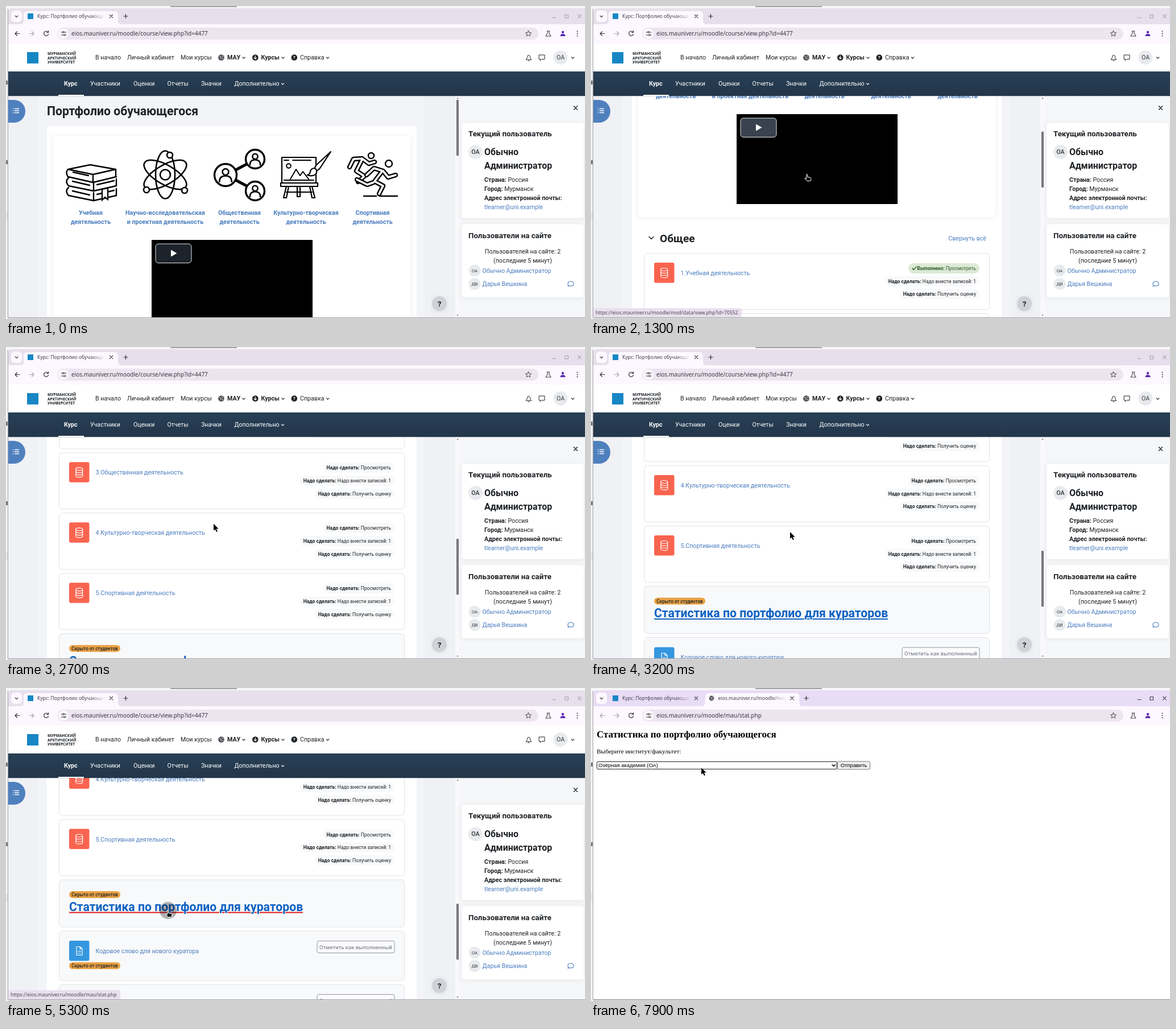
These frames come from a looping animation (1018 px wide and 550 px high, 8000 ms). An HTML page:

```html
<!DOCTYPE html>
<html lang="ru">
<head>
<meta charset="utf-8">
<title>Портфолио</title>
<style>
html, body { margin: 0; width: 100%; height: 100%; overflow: hidden; background: #fff; }
svg { display: block; width: 100%; height: 100%; font-family: Roboto, sans-serif; }
text { white-space: pre; }
.b { font-weight: 700; }
.m { font-weight: 500; }
.ui { font-family: "Noto Sans", sans-serif; }
.serif { font-family: "Liberation Serif", serif; }
.sans { font-family: "Liberation Sans", sans-serif; }
.c { text-anchor: middle; }
.r { text-anchor: end; }
.line { fill: none; stroke-linecap: round; stroke-linejoin: round; }
</style>
</head>
<body>
<svg id="stage" viewBox="0 0 1018 550" preserveAspectRatio="none"></svg>
<script>
const INK = '#1d2125', LINK = '#4a7dbf', BODY = 10.65, SMALL = 8.5;

const text = (x, y, str, size = BODY, cls = '', fill = INK) =>
  `<text x="${x}" y="${y}" font-size="${size}" class="${cls}" fill="${fill}">${str}</text>`;
const rect = (x, y, w, h, fill, r = 0, more = '') =>
  `<rect x="${x}" y="${y}" width="${w}" height="${h}" rx="${r}" fill="${fill}" ${more}/>`;
const circle = (x, y, r, fill, more = '') =>
  `<circle cx="${x}" cy="${y}" r="${r}" fill="${fill}" ${more}/>`;
const line = (d, color = INK, width = 1.2, more = '') =>
  `<path class="line" d="${d}" stroke="${color}" stroke-width="${width}" ${more}/>`;
const shape = (d, fill, more = '') => `<path d="${d}" fill="${fill}" ${more}/>`;
const group = (body, more = '') => `<g ${more}>${body}</g>`;
const at = (x, y, body) => group(body, `transform="translate(${x} ${y})"`);
const chevron = (x, y, s = 2.2, color = INK) => line(`M${x - s} ${y - s / 2}l${s} ${s}l${s} ${-s}`, color);
const cross = (x, y, s, color = '#333', w = 1.2) =>
  line(`M${x - s} ${y - s}l${2 * s} ${2 * s}m0 ${-2 * s}l${-2 * s} ${2 * s}`, color, w);
const avatar = (x, y, r, label, size, cls = '') =>
  circle(x, y, r, '#e8eaed') + text(x, y + size * .36, label, size, 'c ' + cls, '#343a40');

// Browser window
const tab = (x, title, icon) => at(x, 0, icon + text(24, 21.3, title, SMALL, 'ui', 'url(#fade)') + cross(154, 18, 2.6));
const plus = x => line(`M${x - 3.5} 18h7m-3.5 -3.5v7`, '#333');
const tabShape = x => shape(`M${x - 6} 32q6 0 6 -6v-10q0 -7 7 -7h152q7 0 7 7v10q0 6 6 6z`, '#fdf7ff');
const siteIcon = rect(7, 13, 10, 10, '#1687c4');
const globe = (x, y, r) => circle(x, y, r, '#4a4a50') +
  line(`M${x - r * .6} ${y - r * .4}l${r * .6} ${r * .3}l${-r * .2} ${r * .5}M${x + r * .2} ${y - r * .7}l${r * .4} ${r * .5}M${x + r * .2} ${y + r * .5}l${r * .4} ${-r * .2}`, '#fff', .9);

const backdrop =
  rect(0, 0, 1018, 550, '#f6f6f7') + rect(289, 0, 117, 2, '#a3a2a8') +
  rect(0, 131, 3, 7, '#77777b') + rect(0, 271, 3, 7, '#77777b') + rect(0, 361, 3, 14, '#e8e8eb') +
  rect(2.8, 5, 1.2, 543, '#a9a8ae') + rect(4, 547, 1014, 1.5, '#a9a8ae', 0, 'id="edge"') + rect(4, 548.5, 1014, 1.5, '#d9d8dc');

const toolbar =
  rect(4, 32, 1014, 34, '#fdf7ff') + rect(90, 38, 846, 21, '#ece5f0', 10.5) + circle(101, 48.5, 9, '#fdf9ff') +
  line('M97 46h2m4 0h3M97 51h3m4 0h2', '#333') + circle(101, 46, 1.4, 'none', 'stroke="#333"') + circle(102.5, 51, 1.4, 'none', 'stroke="#333"') +
  line('M24 48.5h-8m3.5 -3.5l-3.5 3.5l3.5 3.5', '#333', 1.2, 'id="back"') +
  line('M41 48.5h8m-3.5 -3.5l3.5 3.5l-3.5 3.5', '#aaa4af') +
  line('M74 46a4 4 0 1 0 .5 3.5M74.5 43.5v3h-3', '#333') +
  line('M918.500 43.500l1.500 3.300l3.600 .3l-2.700 2.300l.8 3.500l-3.200 -1.900l-3.200 1.900l.8 -3.500l-2.700 -2.300l3.600 -.3z', '#444', 1) +
  line('M951 44h5M952 44v4l-3 5h9l-3 -5v-4', '#444', 1.1) +
  circle(979, 46, 2.2, '#5b2bb5') + shape('M974.500 53q0 -4 4.500 -4t4.500 4z', '#5b2bb5') +
  [44.5, 48.5, 52.5].map(y => circle(1004.5, y, 1, '#333')).join('');

const strip =
  shape('M4 33v-23q0 -6 6 -6h1008v29z', '#e7dfeb', 'id="strip"') + rect(9, 8, 19, 20, '#fdf7ff', 6) + chevron(18.5, 18.4, 2.4, '#333') +
  group(line('M961 20.500h6M983 15.500h5.500v5.500h-5.500z', 'currentColor', 1.1) + cross(1008.5, 18, 2.8, 'currentColor', 1.1), 'id="controls"');

// Course page
const person = (x, y, r) => circle(x, y, r, '#fff', 'stroke="#000" stroke-width="3.4"') +
  circle(x, y - r * .28, r * .28, '#fff', 'stroke="#000" stroke-width="2.6"') +
  line(`M${x - r * .55} ${y + r * .6}q0 ${-r * .52} ${r * .55} ${-r * .52}t${r * .55} ${r * .52}`, '#000', 2.6);
const tube = d => line(d, '#000', 8.4) + line(d, '#fff', 3.6);

const books =
  line('M109 287l39 -8l45 8l-40 9zM109 287q-5 5 0 13l44 10l41 -10M153 296v13M193 287v13M118 292l27 6', '#000', 2.4) +
  [305, 322].map(y => line(`M110 ${y - 3}q-7 6 0 14l44 9l40 -9v-12M154 ${y + 6}v13M160 ${y + 9}l30 -7M117 ${y + 3}l30 7`, '#000', 2.4)).join('') +
  shape('M169 322l10 -2v20l-5 -4l-5 5z', '#fff', 'stroke="#000" stroke-width="2.2"');
const atom =
  [30, 90, 150].map(a => `<ellipse cx="280" cy="296.500" rx="42" ry="17" fill="none" stroke="#000" stroke-width="2.600" transform="rotate(${a} 280 296.500)"/>`).join('') +
  [[280, 296.5, 9], [288, 262, 5], [247, 323, 5], [314, 324, 5]].map(([x, y, r]) => circle(x, y, r, '#fff', 'stroke="#000" stroke-width="2.600"')).join('');
const network = line('M387 297L438 270M387 297L438 324', '#000', 5) +
  person(386, 297, 19.5) + person(438, 269, 16.5) + person(438, 325, 16.5);
const easel =
  line('M485 311v-45h60v45M483 311h65v6h-65zM493 317l-5 20h5l4 -20M538 317l5 20h-5l-4 -20M512 317v18h5v-18M493 327h45', '#000', 2.2) +
  line('M489 306h52M500 304l10 -17l7 11l5 -7l10 13M489 271h8M504 271h32', '#000', 2) + circle(497, 281, 3.8, 'none', 'stroke="#000" stroke-width="2"') +
  shape('M571 256l-19 29q-5 6 -8 3t2 -9z', '#fff', 'stroke="#000" stroke-width="2.200" stroke-linejoin="round"') +
  shape('M543 285q-7 0 -8 6t-6 6q10 3 15 -1q4 -4 1 -9z', '#fff', 'stroke="#000" stroke-width="2.200"');
const runners =
  circle(642, 263, 5, '#fff', 'stroke="#000" stroke-width="2.400"') +
  tube('M604 283l7 -14l15 -1l12 9l10 -3M626 270l-10 20l14 9l-11 10') +
  circle(673, 277, 6, '#fff', 'stroke="#000" stroke-width="2.400"') +
  tube('M634 297l13 -12l16 5l9 11l13 -4M661 291l-13 17l15 8l-7 14M646 310l-11 4l-18 -9') +
  line('M629 334h22M657 334h31', '#000', 2.4);

const captions = [[149, 'Учебная', 'деятельность'], [280, 'Научно-исследовательская', 'и проектная деятельность'],
  [410.5, 'Общественная', 'деятельность'], [527.5, 'Культурно-творческая', 'деятельность'], [644.5, 'Спортивная', 'деятельность']]
  .map(([x, a, b]) => text(x, 367, a, BODY, 'b c', LINK) + text(x, 382.6, b, BODY, 'b c', LINK)).join('');

const video = rect(256, 411, 283, 158, '#000') +
  rect(263, 418, 63, 33.5, '#1d232b', 5, 'id="play" stroke="#e8e8e8"') + shape('M290 428.500l10.500 6l-10.500 6z', '#fff');

const pill = (left, y, label, value) => rect(left, y - 9, 683 - left, 18, '#f8f9fa', 9) +
  `<text x="677" y="${y + 3}" font-size="${SMALL}" class="r" fill="${INK}"><tspan class="b">${label}:</tspan> ${value}</text>`;
const frame = (y, h, fill) => rect(93.5, y, 607, h, fill, 6, 'stroke="#dee2e6"');
const hiddenBadge = y => rect(111, y, 90, 12, '#e8a145', 6) + text(156, y + 9, 'Скрыто от студентов', 8.15, 'm c');
const doneButton = y => rect(547, y, 136, 21, '#fbfbfc', 3, 'stroke="#8f959e"') + text(615, y + 14, 'Отметить как выполненный', 9.6, 'c', '#6a737b');

const database = line('M-6 -6a6 2.500 0 0 1 12 0v12a6 2.500 0 0 1 -12 0zM-6 -6a6 2.500 0 0 0 12 0M-6 -2a6 2.500 0 0 0 12 0M-6 2a6 2.500 0 0 0 12 0', '#fff', 1.2);
const items = ['Учебная', 'Научно-исследовательская', 'Общественная', 'Культурно-творческая', 'Спортивная'].map((name, i) => {
  const first = i === 0;
  return at(0, 655 + 106 * i, frame(.5, 99, '#fff') + rect(111, 17, 35.5, 35.5, '#f9644f', 3) + at(128.7, 35, database) +
    text(157.5, 39, `${i + 1}.${name} деятельность`, BODY, '', LINK) +
    (first ? rect(558, 18, 125, 18, '#dce9d6', 9) + line('M565 27l2.300 2.500l4.500 -5', '#2b5a24', 1.4) +
      `<text x="677" y="30" font-size="${SMALL}" class="r" fill="#2b5a24"><tspan class="b">Выполнено:</tspan> Просмотреть</text>`
      : pill(558, 27, 'Надо сделать', 'Просмотреть')) +
    pill(517, 49.6, 'Надо сделать', 'Надо внести записей: 1') + pill(543, 72.3, 'Надо сделать', 'Получить оценку'));
}).join('');

const statistics = frame(1185.5, 83, '#f8f9fa') + hiddenBadge(1205.5) +
  rect(111, 1242, 411, 2, '#0f62c2', 0, 'id="underline"') +
  group(text(111, 1240.3, 'Статистика по портфолио для кураторов', 21.2, 'b', '#0f62c2'), 'paint-order="stroke" stroke="#f8f9fa" stroke-width="2"');
const codeword = frame(1275.5, 87, '#f8f9fa') + rect(111, 1292.5, 35.5, 35.5, '#3597df', 3) +
  line('M124 1303h6l4 4v11h-10zM130 1303v4h4M126.500 1311h5M126.500 1314.500h5', '#fff') +
  text(157.5, 1314, 'Кодовое слово для нового куратора', BODY, '', LINK) + hiddenBadge(1330.5) + doneButton(1293);

const content =
  text(72, 192, 'Портфолио обучающегося', 21.2, 'b') + rect(72, 211, 650, 1300, '#fff', 7) +
  rect(83, 228, 628, 364, '#fff', 5, 'filter="url(#soft)"') +
  books + atom + network + easel + runners + captions + video +
  line('M102 626.500l4 4l4 -4', INK, 1.5) + text(121, 635.5, 'Общее', 19.1, 'b') + text(695, 632.6, 'Свернуть всё', BODY, 'r', LINK) +
  items + statistics + codeword + frame(1369.5, 87, '#f8f9fa') + doneButton(1387);

const navText = (y, fill, list) => list.map(([x, s, cls = '']) => text(x, y, s, BODY, cls, fill)).join('');
const header =
  rect(4, 66, 1014, 49, '#fff') + rect(37, 81, 20, 20, '#1687c4') +
  ['МУРМАНСКИЙ', 'АРКТИЧЕСКИЙ', 'УНИВЕРСИТЕТ'].map((s, i) => text(73, 86.4 + 7.2 * i, s, 6.6, 'ui b')).join('') +
  navText(94.3, INK, [[157, 'В начало'], [213, 'Личный кабинет'], [307, 'Мои курсы'], [389, 'МАУ', 'b'], [448.5, 'Курсы', 'b'], [517, 'Справка']]) +
  globe(378.5, 90.5, 5.3) + circle(438.3, 90.5, 5.3, INK) + line('M438.300 87.500v5.500m-2.300 -2.200l2.300 2.300l2.300 -2.300', '#fff') +
  circle(506.8, 90.5, 5.3, INK) + text(506.8, 93.4, '?', 8, 'b c', '#fff') +
  [418, 487, 565.5, 996.5].map(x => chevron(x, 91)).join('') +
  line('M914.500 94q2 -2 2 -4.500q0 -3 2.500 -3t2.500 3q0 2.500 2 4.500zM918 96h2', INK, 1) +
  line('M937.500 86h9.500v7.500h-5l-2.500 2.500v-2.500h-2z', INK, 1) + avatar(975, 90.5, 12.5, 'ОА', BODY) +
  rect(4, 115, 1014, 43, 'url(#navy)') +
  navText(140, '#fff', [[102, 'Курс', 'b'], [148, 'Участники'], [224, 'Оценки'], [283.5, 'Отчеты'], [343, 'Значки'], [401.5, 'Дополнительно']]) +
  chevron(486.5, 137, 2.2, '#fff') + rect(92, 156, 45, 2, '#fff') + rect(4, 158, 1014, 1.5, '#00000018');

const field = (y, label, value) => `<text x="841" y="${y}" font-size="${BODY}" fill="${INK}"><tspan class="b">${label}:</tspan> ${value}</text>`;
const drawer =
  rect(797, 158, 221, 389, '#f6f7f9') + cross(1001.5, 179, 3, INK, 1.5) +
  rect(801, 205, 215, 167.5, '#fff', 5, 'filter="url(#soft)"') + rect(801, 383.5, 215, 128.5, '#fff', 5, 'filter="url(#soft)"') +
  text(813, 228.6, 'Текущий пользователь', 13.3, 'b') + avatar(825.5, 256.5, 12.5, 'ОА', BODY, 'm') +
  text(841, 262, 'Обычно', 15.9, 'b') + text(841, 286, 'Администратор', 15.9, 'b') +
  field(309.2, 'Страна', 'Россия') + field(325.3, 'Город', 'Мурманск') + field(341.3, 'Адрес электронной почты', '') +
  text(841, 357.2, 'tlearner@uni.example', BODY, '', LINK) + text(813, 407.5, 'Пользователи на сайте', 13.3, 'b') +
  text(908.5, 435.2, 'Пользователей на сайте: 2', BODY, 'c') + text(908.5, 450.8, '(последние 5 минут)', BODY, 'c') +
  avatar(824, 465, 10.5, 'ОА', 8) + text(837.5, 469, 'Обычно Администратор', BODY, '', LINK) +
  avatar(824, 488.5, 10.5, 'ДВ', 8) + text(837.5, 492.4, 'Дарья Вешкина', BODY, '', LINK) +
  line('M989 492q-1 -1 -1 -4q0 -4 5 -4t5 4t-5 4q-1.500 0 -2.500 -.5l-2.500 1z', LINK, 1.1);

const course =
  rect(4, 158, 793, 389, '#eff1f5') + rect(56, 158, 680, 389, '#f3f4f8') +
  group(group(content, 'id="scroll"'), 'clip-path="url(#view)"') +
  shape('M4 165h10a20 20 0 0 1 0 40h-10z', '#4f80be') +
  line('M15.500 180.500h7m-7 3.500h7m-7 3.500h7', '#fff', 1.3) + line('M12.500 180.500h.1m0 3.500h.1m-.1 3.500h.1', '#fff', 1.6) +
  rect(790, 158, 7, 389, '#f9f9fb') + rect(791.8, 165, 4.2, 98, '#79797d', 0, 'id="thumb"') +
  shape('M792.500 163l1.500 -2l1.500 2zM792.500 542.500l1.500 2l1.500 -2z', '#555') +
  circle(762, 523, 13, '#cfd3d8', 'filter="url(#soft)"') + text(762, 527.8, '?', 13.5, 'b c') + drawer + header +
  group(rect(4, 531, 261, 16, '#e9e0ee', 3, 'id="bubble"') + text(8, 542, '', SMALL, 'ui', '#4b4453').replace('<text', '<text id="address"'), 'id="status"') +
  tabShape(31) + tab(31, 'Курс: Портфолио обучающегося', siteIcon) + plus(210.5);

// Statistics page
const report =
  rect(4, 66, 1014, 481, '#fff') + tab(31, 'Курс: Портфолио обучающегося', siteIcon) + tabShape(200.5) +
  tab(199.5, 'eios.mauniver.ru/moodle/mau/stat.php', group(globe(0, 0, 4.4), 'id="favicon"')) + plus(378.5) +
  text(10, 86.5, 'Статистика по портфолио обучающегося', 17, 'serif b', '#000') +
  text(10, 114.5, 'Выберите институт/факультет:', 11.35, 'serif', '#000') +
  rect(10.5, 129.5, 421.5, 13, '#fff', 1, 'id="select" stroke="#767676"') + text(13, 139.4, 'Озёрная академия (ОА)', 9.43, 'sans', '#000') +
  line('M426.500 134.800l2.700 2.700l2.700 -2.700', '#000', 1.4, 'transform="translate(-2.500 0)"') +
  rect(433.5, 129, 57, 14, '#efefef', 2, 'stroke="#767676"') + text(462, 139.4, 'Отправить', 9.43, 'sans c', '#000');

const pointer =
  shape('M0 0v12l2.700 -2.500l2.200 4.600l2 -.9l-2.200 -4.500h3.900z', '#000', 'id="arrow" stroke="#fff" stroke-width=".9" paint-order="stroke"') +
  shape('M-1 0q1.300 -1 1.800 .5v4l5 1q1.500 .5 1 3l-1 3h-6l-4 -4.500q0 -1.500 2.200 0l.5 .3z', '#111', 'id="hand" stroke="#fff" stroke-width="1"');

const $ = id => document.getElementById(id);
$('stage').innerHTML = `<defs>
  <linearGradient id="fade" gradientUnits="userSpaceOnUse" x1="118" x2="143" y1="0" y2="0"><stop stop-color="#403b46"/><stop offset="1" stop-color="#403b46" stop-opacity="0"/></linearGradient>
  <linearGradient id="navy" x2="0" y2="1"><stop stop-color="#284056"/><stop offset="1" stop-color="#23364a"/></linearGradient>
  <filter id="soft" x="-10%" y="-15%" width="120%" height="130%"><feDropShadow dx="0" dy="1" stdDeviation="4" flood-opacity=".07"/></filter>
  <clipPath id="view"><rect x="4" y="158" width="786" height="389"/></clipPath></defs>` +
  backdrop + strip + toolbar + group(course, 'id="course"') + group(report, 'id="report"') +
  text(115, 52.2, '', 10, 'ui', '#3c3743').replace('<text', '<text id="url"') +
  circle(285, 391, 15, '#000', 'id="halo"') + group(pointer, 'id="pointer"');

// Timeline: [ms, values...]
const SCROLL = [[800, 0], [900, 30], [1300, 221], [2100, 589], [2400, 665], [2600, 665], [3200, 765], [3400, 848.5]];
const POINTER = [[100, 425, 0], [700, 382, 296], [1300, 380, 296], [2100, 370, 306], [2600, 368, 308], [3200, 350, 325],
  [3500, 350, 325], [4300, 298, 391], [4400, 298, 391], [4700, 285, 391], [6700, 285, 391], [7500, 186, 150], [7600, 186, 142], [7700, 194, 140]];

function track(keys, t) {
  const next = keys.findIndex(k => k[0] > t);
  if (next === 0) return keys[0].slice(1);
  if (next < 0) return keys[keys.length - 1].slice(1);
  const a = keys[next - 1], b = keys[next], p = (t - a[0]) / (b[0] - a[0]);
  return a.slice(1).map((v, i) => v + (b[i + 1] - v) * p);
}
const set = (id, name, value) => $(id).setAttribute(name, value);
const show = (id, on) => set(id, 'visibility', on ? 'visible' : 'hidden');

function draw(t) {
  const within = (a, b) => t >= a && t < b;
  const [scroll] = track(SCROLL, t), [x, y] = track(POINTER, t);
  const opened = t >= 6000, focused = t >= 5400, onHeading = within(4200, 6000);
  const onLink = within(700, 1500) || onHeading, onStats = t >= 4500;

  set('scroll', 'transform', `translate(0 ${-scroll})`);
  set('thumb', 'y', 165 + scroll * .2525);
  set('play', 'fill', within(1100, 1500) ? '#39424e' : '#1d232b');
  set('underline', 'fill', onHeading ? '#e01b1b' : '#0f62c2');

  $('course').style.display = opened ? 'none' : '';
  $('report').style.display = opened ? '' : 'none';
  $('url').textContent = 'eios.mauniver.ru/moodle/' + (opened ? 'mau/stat.php' : 'course/view.php?id=4477');
  set('back', 'stroke', opened ? '#aaa4af' : '#333');
  set('strip', 'fill', focused ? '#e9dcf5' : '#e7dfeb');
  set('edge', 'fill', focused ? '#8f8e94' : '#a9a8ae');
  set('controls', 'color', focused ? '#3c3743' : '#a8a0ad');

  show('status', within(700, 1500) || within(4500, 6000));
  set('bubble', 'width', onStats ? 197 : 261);
  $('address').textContent = 'https://eios.mauniver.ru/moodle/' + (onStats ? 'mau/stat.php' : 'mod/data/view.php?id=70552');

  set('favicon', 'transform', `translate(12.500 18) scale(${t < 6500 ? .65 : 1})`);
  set('select', 'stroke', t >= 7700 ? '#222' : '#767676');
  set('halo', 'opacity', within(5100, 6500) ? .3 * (6500 - t) / 1200 : 0);
  set('pointer', 'transform', `translate(${x} ${y})`);
  show('arrow', t >= 100 && !onLink);
  show('hand', onLink);
}

function tick() {
  draw(Math.floor(performance.now() % 8000 / 100) * 100);
  requestAnimationFrame(tick);
}
tick();
</script>
</body>
</html>
```
